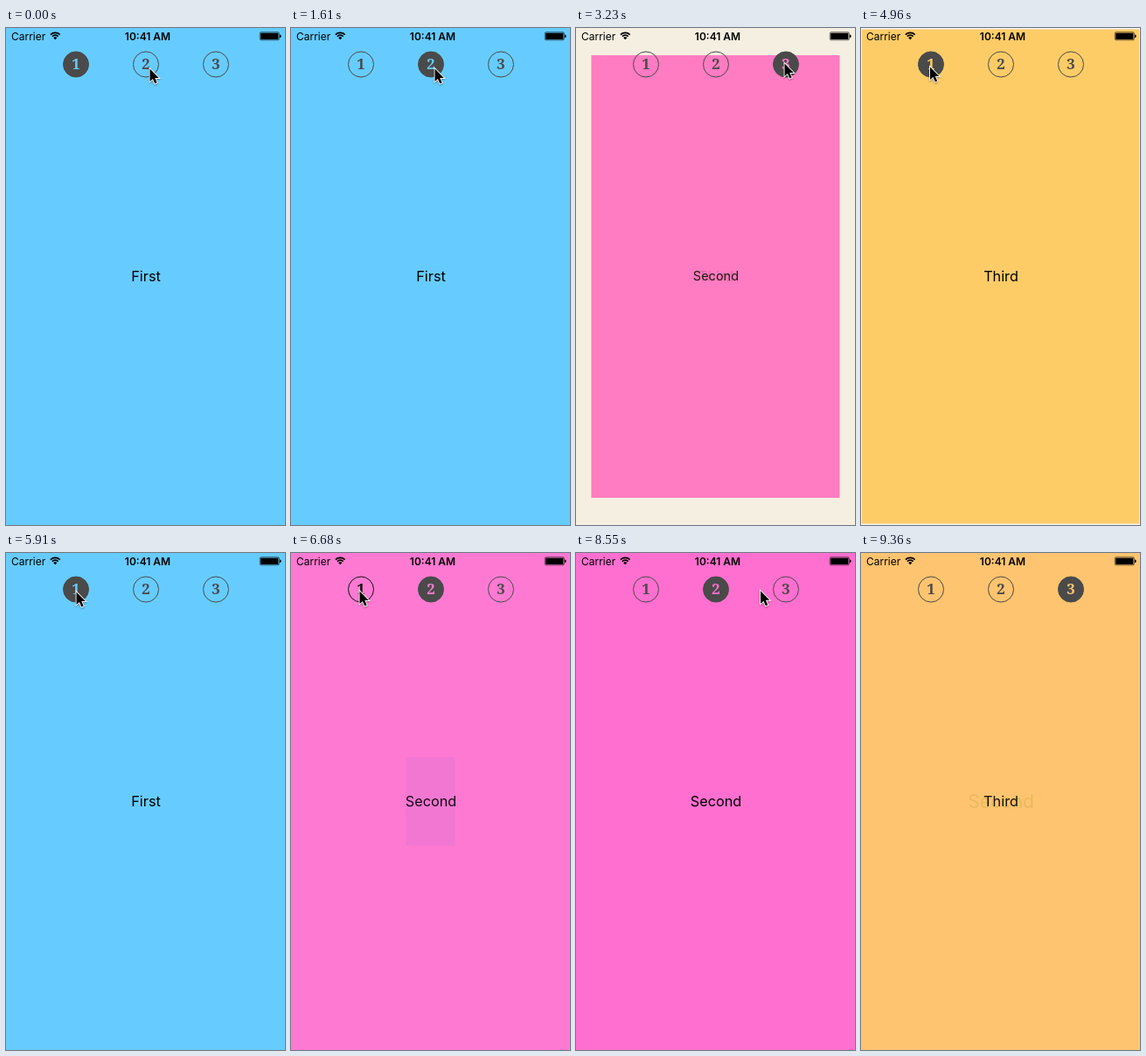
Recreate the animation shown at these times as an HTML page with a canvas. Size 319 by 567 pixels, loop 9.71 s.

```html
<!DOCTYPE html>
<html lang="en">
<head>
<meta charset="utf-8">
<title>View transitions</title>
<style>
  html, body { margin: 0; width: 100%; height: 100%; overflow: hidden; }
  canvas { display: block; }
</style>
</head>
<body>
<canvas id="stage" width="319" height="567"></canvas>
<script>
const W = 319, H = 567, LOOP = 9710, END = 9360, STEP = 50;
const INK = '#4a4a4a', BACKDROP = '#f4f4f4';
const ctx = document.getElementById('stage').getContext('2d');
const layer = new OffscreenCanvas(W, 60);
const layerCtx = layer.getContext('2d');

const views = [
  { name: 'First', color: '#66ccff' },
  { name: 'Second', color: '#ff6fcf' },
  { name: 'Third', color: '#ffcc66' }
];

// tap selects the button, start begins the spring, exit is the scale of the leaving view
const moves = [
  { tap: 1610, start: 1670, to: 1, exit: 0.1 },
  { tap: 3180, start: 3180, to: 2, exit: 0.1 },
  { tap: 4960, start: 4960, to: 0, exit: 0.1 },
  { tap: 6380, start: 6380, to: 1, exit: 0.1 },
  { tap: 6830, start: 6830, to: 0, exit: 0.1 },
  { tap: 8030, start: 8030, to: 1, exit: 0.1 },
  { tap: 9020, start: 9020, to: 2, exit: 1.32 }
];

// time, x, y of the pointer tip
const pointerPath = [
  [0, 164.5, 46.5], [2250, 164.5, 46.5], [2950, 238.5, 40.5], [3600, 238.5, 40.5],
  [4250, 53, 12], [4750, 79, 44.5], [5880, 79, 44.5], [6260, 160, 46],
  [6400, 160, 46], [6640, 78.5, 43.5], [7200, 78.5, 43.5], [7800, 174, 45],
  [8250, 174, 45], [8800, 239, 42], [9060, 239, 42], [9340, 335, 62]
];

function spring(ms) {
  const t = ms / 1000, decay = 6.9, freq = 6.09;
  return 1 - Math.exp(-decay * t) * (Math.cos(freq * t) + decay / freq * Math.sin(freq * t));
}

function text(c, string, x, y, font, align = 'center') {
  c.font = font;
  c.textAlign = align;
  c.fillText(string, x, y);
}

function drawView(view, scale, alpha) {
  ctx.save();
  ctx.globalAlpha = alpha;
  ctx.translate(W / 2, H / 2);
  ctx.scale(scale, scale);
  ctx.translate(-W / 2, -H / 2);
  ctx.fillStyle = view.color;
  ctx.fillRect(0, 0, W, H);
  ctx.fillStyle = '#000';
  text(ctx, view.name, 160, 289, '16.3px Inter, sans-serif');
  ctx.restore();
}

function drawViews(t) {
  const index = moves.findLastIndex(m => m.start <= t);
  if (index < 0) return drawView(views[0], 1, 1);
  const move = moves[index];
  const from = index ? moves[index - 1].to : 0;
  const p = spring(12 + Math.floor((t - move.start) / STEP) * STEP);
  drawView(views[from], 1 + (move.exit - 1) * p, 1);
  drawView(views[move.to], 1, Math.min(p, 1));
}

// The digit of the selected button is cut out of its disc.
function drawButtons(t) {
  const last = moves.findLast(m => m.tap <= t);
  const selected = last ? last.to : 0;
  const c = layerCtx;
  c.clearRect(0, 0, W, 60);
  for (let i = 0; i < 3; i++) {
    const x = 80 + i * 80;
    const pressed = i === 0 && t >= 6640 && t < 6830;
    c.fillStyle = c.strokeStyle = pressed ? '#111' : INK;
    c.lineWidth = 1;
    c.beginPath();
    c.arc(x, 41.5, 14.5, 0, 2 * Math.PI);
    c.stroke();
    if (i === selected) {
      c.fill();
      c.globalCompositeOperation = 'destination-out';
    }
    text(c, i + 1, x, 47, 'bold 17px "Noto Serif", serif');
    c.globalCompositeOperation = 'source-over';
  }
  ctx.drawImage(layer, 0, 0);
}

function drawStatusBar() {
  ctx.fillStyle = ctx.strokeStyle = '#000';
  text(ctx, 'Carrier', 6, 14, '12px Inter, sans-serif', 'left');
  text(ctx, '10:41 AM', 162, 14, '600 12px Inter, sans-serif');

  ctx.lineWidth = 1.7;
  for (const r of [7.6, 4.8]) {
    ctx.beginPath();
    ctx.arc(56.3, 13, r, -Math.PI * 0.75, -Math.PI * 0.25);
    ctx.stroke();
  }
  ctx.beginPath();
  ctx.moveTo(56.3, 13.2);
  ctx.arc(56.3, 13.2, 2.9, -Math.PI * 0.75, -Math.PI * 0.25);
  ctx.fill();

  ctx.lineWidth = 0.6;
  ctx.beginPath();
  ctx.roundRect(290.3, 4.8, 22, 9, 1.4);
  ctx.stroke();
  ctx.fillRect(291.2, 5.7, 20.2, 7.2);
  ctx.beginPath();
  ctx.roundRect(313, 7.6, 1.6, 3.4, [0, 1.5, 1.5, 0]);
  ctx.fill();
}

function drawPointer(t) {
  const next = pointerPath.findIndex(k => k[0] > t);
  if (next < 0) return;
  const [t0, x0, y0] = pointerPath[next - 1], [t1, x1, y1] = pointerPath[next];
  const u = (t - t0) / (t1 - t0), e = u * u * (3 - 2 * u);
  ctx.save();
  ctx.translate(x0 + (x1 - x0) * e, y0 + (y1 - y0) * e);
  const arrow = new Path2D('M0 0V14.5L3.4 11.4L5.8 17L8.2 16L5.8 10.5H10.3Z');
  ctx.shadowColor = 'rgba(0,0,0,.4)';
  ctx.shadowBlur = 2;
  ctx.shadowOffsetY = 1;
  ctx.strokeStyle = '#fff';
  ctx.lineWidth = 1.8;
  ctx.stroke(arrow);
  ctx.shadowColor = 'transparent';
  ctx.fillStyle = '#000';
  ctx.fill(arrow);
  ctx.restore();
}

function frame() {
  const t = Math.min(performance.now() % LOOP, END);
  ctx.fillStyle = BACKDROP;
  ctx.fillRect(0, 0, W, H);
  drawViews(t);
  drawButtons(t);
  drawStatusBar();
  drawPointer(t);
  requestAnimationFrame(frame);
}
frame();
</script>
</body>
</html>
```
